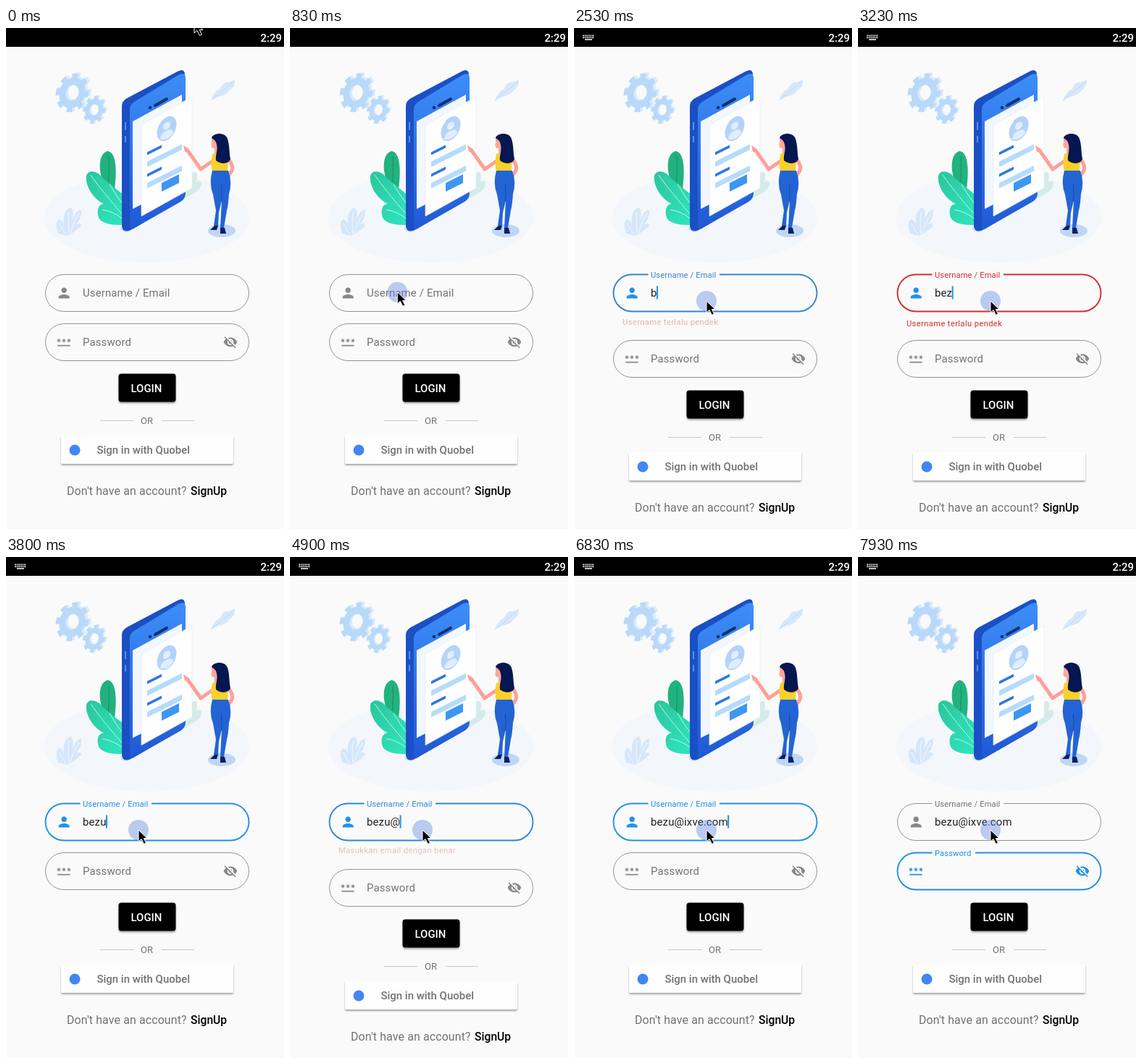
These frames come from a looping animation (384 by 692 pixels, 8000 ms). An HTML page:

```html
<!DOCTYPE html>
<html lang="en">
<head>
<meta charset="utf-8">
<title>Login form</title>
<style>
  html, body { margin: 0; width: 100%; height: 100%; overflow: hidden; background: #fafafa; }
  svg { display: block; width: 100vw; height: 100vh; }
  text { font-family: Roboto, sans-serif; font-size: 14.95px; letter-spacing: .14px; white-space: pre; }
  .medium { font-weight: 500; letter-spacing: 0; }
  .muted { fill: #727272; }
</style>
</head>
<body>
<svg viewBox="0 0 384 692">
  <defs>
    <linearGradient id="face" x1="0" y1="0" x2="0" y2="1">
      <stop offset="0" stop-color="#3d8ef8"/><stop offset="1" stop-color="#2059d6"/>
    </linearGradient>
    <linearGradient id="leaf" x1="0" y1="0" x2="1" y2="1">
      <stop offset="0" stop-color="#2cc59c"/><stop offset="1" stop-color="#2fe6c0"/>
    </linearGradient>
    <filter id="shadow" x="-10%" y="-20%" width="120%" height="160%">
      <feDropShadow dx="0" dy="2" stdDeviation="1.3" flood-color="#000" flood-opacity=".34"/>
    </filter>
    <g id="gear" fill="none">
      <circle r="15.5" stroke-width="10"/>
      <circle r="22.5" stroke-width="7" pathLength="16" stroke-dasharray="1 1"/>
    </g>
  </defs>

  <rect width="384" height="692" fill="#fafafa"/>

  <g id="illustration">
    <ellipse cx="194" cy="262" rx="142" ry="62" fill="#f3f7fc"/>
    <g transform="translate(95 88) skewY(-9) scale(.88 1.02)"><use href="#gear" stroke="#d9eafb"/><use href="#gear" x="-4" y="1" stroke="#b9d9fa"/></g>
    <g transform="translate(124 112) skewY(-9) scale(.6 .74)"><use href="#gear" stroke="#d9eafb"/><use href="#gear" x="-4" y="1" stroke="#b9d9fa"/></g>
    <path d="M283 100Q287 88 296 84 300 73 308 75L316 72Q317 80 309 86 303 94 293 95Z" fill="#d6e8fb"/>
    <path d="M283 100Q300 88 316 72" fill="none" stroke="#bfdbf8"/>
    <path d="M72 284Q67 270 73 264 79 265 80 273 78 252 89 248 95 251 91 267 97 251 104 251 105 262 97 271 103 268 104 273 96 282 84 287Z" fill="#d5e7fa"/>
    <path d="M74 270Q78 280 84 286M87 254Q85 273 87 284M101 256Q91 272 89 284" fill="none" stroke="#f5f9fe"/>
    <path d="M248 235C249 218 253 203 259 199 267 198 264 209 262 213 269 208 273 214 268 221 264 228 255 230 248 235Z" fill="#d3ece9"/>

    <path d="M134 213C127 194 128 174 140 170 153 171 153 199 150 222Z" fill="#22b27f"/>
    <path d="M142 177Q143 199 141 214" fill="none" stroke="#158d66"/>
    <path d="M164 272C143 273 128 269 127 258 125 247 131 243 135 243 119 235 109 216 111 204 114 195 127 197 134 208 145 215 151 223 164 231Z" fill="url(#leaf)"/>
    <path d="M117 203Q133 226 163 260M133 251Q148 253 163 265M143 216Q152 231 161 243" fill="none" stroke="#b9f7e8"/>
    <ellipse cx="166" cy="277" rx="8" ry="5" fill="#cfe0f5"/>

    <path d="M160 108Q160 101 167 97L237 60Q247 55 247 65L247 230Q247 236 241 240L172 279Q161 284 160 273Z" fill="#1b4fc4"/>
    <path d="M171 113Q171 106 177 102L238 65Q248 60 248 69L248 229Q248 235 242 239L178 276Q171 281 171 273Z" fill="url(#face)"/>
    <path d="M175 129L243 92V215L175 250Z" fill="#f2f7fe"/>
    <path d="M206 107L222 98" stroke="#15306f" stroke-width="4" stroke-linecap="round"/>
    <circle cx="199" cy="110" r="2.3" fill="#15306f"/>
    <path d="M165 130v11M165 149v9" stroke="#4f90f5" stroke-width="2"/>

    <path d="M187 134L257 95V221L187 260Z" fill="#fefefe" stroke="#e6edf6" stroke-width=".7"/>
    <g transform="translate(222 139) skewY(-25)">
      <ellipse rx="13.5" ry="16" fill="#b4d3fb"/>
      <circle cy="-4" r="5" fill="#e2eefd"/>
      <path d="M-9 10Q-8 2 0 3 8 2 9 10 0 18-9 10Z" fill="#e2eefd"/>
    </g>
    <g transform="translate(195 0) skewY(-26.5)">
      <path d="M0 171.5h20v4H0zM0 201.5h20v4H0z" fill="#2b78e6"/>
      <path d="M0 184.5h48v7.5H0zM0 214h48v7.5H0z" fill="#b5dbfd"/>
      <path d="M20 224h24v12H20z" fill="#3d96f2"/>
    </g>

    <ellipse cx="298" cy="280" rx="19" ry="9" fill="#bdd6f6"/>
    <path d="M306 180Q315 190 312 197L305 207" fill="none" stroke="#ff9f98" stroke-width="5" stroke-linejoin="round"/>
    <path d="M288 182L269 195 250 168" fill="none" stroke="#ff9f98" stroke-width="5" stroke-linejoin="round"/>
    <path d="M247 171L245 162 251 166 254 171Z" fill="#ff9f98"/>
    <path d="M284 150Q291 145 296 151V174H288V166Q282 167 284 158Z" fill="#ffa69d"/>
    <path d="M285 174Q297 169 307 178L306 199H285Q282 187 285 174Z" fill="#fbd02b"/>
    <path d="M285 197H307Q313 213 308 229 307 245 305 252L301 276H296L298 238 294 255 293 273H287L290 252 286 230Q280 215 285 197Z" fill="#2364d4"/>
    <path d="M297 216Q299 229 297 240" fill="none" stroke="#184aa8"/>
    <path d="M288 273L293 273 291 279H282ZM296 276H302L304 284H296Z" fill="#101f5e"/>
    <path d="M284 152C286 145 302 143 306 153 309 162 308 171 310 181 307 189 295 188 290 183 289 175 293 169 291 161Q290 155 284 152Z" fill="#061650"/>
  </g>

  <g id="fields"></g>
  <text id="error" x="67" fill="#d32f2f" style="font-size:11.2px;letter-spacing:.37px"></text>
  <text id="typed" x="106" y="370.5" fill="#212121"></text>
  <rect id="caret" y="356.5" width="2" height="18" fill="#2191e8"/>

  <g id="actions">
    <rect x="155.5" y="477.5" width="79" height="39" rx="3.7" fill="#000" filter="url(#shadow)"/>
    <text x="172.5" y="502.5" class="medium" fill="#fff">LOGIN</text>
    <path d="M130 542.5H176M215 542.5H260" stroke="#c8c8cc"/>
    <text x="186" y="546.8" class="muted" style="font-size:13px">OR</text>
    <rect x="76" y="563" width="238" height="39" rx="2" fill="#fefefe" filter="url(#shadow)"/>
    <circle cx="95" cy="583" r="7.5" fill="#4285f4"/>
    <text x="125.5" y="588" class="medium muted">Sign in with Quobel</text>
    <text x="84" y="645" class="muted" style="font-size:15.9px">Don't have an account?</text>
    <text x="255" y="645" class="medium" style="font-size:15.7px">SignUp</text>
  </g>

  <rect width="384" height="26" fill="#000"/>
  <text x="351.5" y="19" class="medium" fill="#fff">2:29</text>
  <g id="keyboard" fill="none" stroke="#bdbdbd" stroke-width="2">
    <path d="M12 10.5H28M12 13.3H28" stroke-dasharray="2 .6"/><path d="M15 16H25"/>
  </g>

  <g id="pointer">
    <circle id="halo" r="14" fill="#5b83e0" fill-opacity=".4"/>
    <path d="M0 0V16L4 12.5 7.5 19.5 10.5 18 7.3 11.5H12Z" fill="#000" stroke="#fff" stroke-width="1"/>
  </g>
</svg>

<script>
const LOOP = 8000;
const FADE = 167;
const SHIFT = 23;
const GRAY = [136, 136, 138], TEXT = [114, 114, 114], BLUE = [33, 145, 232], RED = [211, 47, 47];
const ADDRESS = 'bezu@ixve.com';
const KEY_TIMES = [2470, 2700, 2950, 3330, 4850, 5200, 5350, 5600, 5700, 6100, 6500, 6600, 6700];
const USER_FOCUS = 1720, PASSWORD_FOCUS = 7700;
const ERRORS = [
  { from: 2470, to: 3330, text: 'Username terlalu pendek' },
  { from: 4850, to: 6600, text: 'Masukkan email dengan benar' },
];
// Pointer stops: time, x, y
const PATH = [
  [30, 260, -9], [150, 214, 150], [270, 135, 230], [570, 135, 230],
  [900, 150, 382], [1300, 193, 357], [1800, 193, 357], [2130, 183, 377],
];
const ICONS = {
  person: '<path transform="translate(69 14.8) scale(.934)" d="M12 12c2.21 0 4-1.79 4-4s-1.79-4-4-4-4 1.79-4 4 1.79 4 4 4zm0 2c-2.67 0-8 1.34-8 4v2h16v-2c0-2.66-5.33-4-8-4z"/>',
  secret: `<g transform="translate(69.5 15) scale(.87)" fill="none" stroke="currentColor" stroke-width="1.3">
    <path d="M2 18H22" stroke-width="2"/>${[0, 8, 16].map(x =>
      `<path d="M${x + 1} 10h6m-4.5-2.6l3 5.2m0-5.2l-3 5.2"/>`).join('')}</g>
    <path transform="translate(299.8 15.6) scale(.85)" d="M12 7c2.76 0 5 2.24 5 5 0 .65-.13 1.26-.36 1.83l2.92 2.92c1.51-1.26 2.7-2.89 3.43-4.75-1.73-4.39-6-7.5-11-7.5-1.4 0-2.74.25-3.98.7l2.16 2.16C10.74 7.13 11.35 7 12 7zM2 4.27l2.74 2.74C3.08 8.3 1.78 10.02 1 12c1.73 4.39 6 7.5 11 7.5 1.55 0 3.03-.3 4.38-.84L19.73 22 21 20.73 3.27 3zM7.53 9.8l1.55 1.55c-.05.21-.08.43-.08.65 0 1.66 1.34 3 3 3 .22 0 .44-.03.65-.08l1.55 1.55c-.67.33-1.41.53-2.2.53-2.76 0-5-2.24-5-5 0-.79.2-1.53.53-2.2zm4.31-.78l3.15 3.15.02-.16c0-1.66-1.34-3-3-3z"/>`,
};

const $ = id => document.getElementById(id);
const clamp = v => Math.max(0, Math.min(1, v));
const smooth = v => v * v * (3 - 2 * v);
const lerp = (a, b, p) => a + (b - a) * p;
const progress = (t, start) => clamp((t - start) / FADE);
const ramp = (t, start) => smooth(progress(t, start));
const mix = (a, b, p) => a.map((v, i) => lerp(v, b[i], p));
const rgb = c => `rgb(${c.map(Math.round)})`;

function createField(label, icons, gapWidth) {
  const group = document.createElementNS('http://www.w3.org/2000/svg', 'g');
  group.innerHTML = `
    <rect x="54.5" y=".5" width="281" height="51" rx="25.5" fill="none"/>
    <rect x="102.5" y="-2" width="${gapWidth}" height="6" fill="#fafafa"/>
    <g>${icons}</g><text>${label}</text>`;
  $('fields').append(group);
  const [outline, gap, icon, text] = group.children;
  return (y, floated, focus, error) => {
    group.setAttribute('transform', `translate(0 ${y})`);
    outline.setAttribute('stroke', rgb(mix(mix(GRAY, BLUE, focus), RED, error)));
    outline.setAttribute('stroke-width', lerp(.9, 1.9, focus));
    const middle = 102.5 + gapWidth / 2;
    gap.setAttribute('transform', `translate(${middle * (1 - floated)}) scale(${floated} 1)`);
    const tint = rgb(mix(GRAY, BLUE, focus));
    icon.setAttribute('fill', tint);
    icon.setAttribute('color', tint);
    text.setAttribute('fill', rgb(mix(mix(TEXT, BLUE, focus), RED, error)));
    text.setAttribute('transform', `translate(106 ${lerp(30.5, 5, floated)}) scale(${lerp(1, .75, floated)})`);
  };
}

const drawUser = createField('Username / Email', ICONS.person, 98.5);
const drawPassword = createField('Password', ICONS.secret, 59.5);

function pointerAt(t) {
  const next = PATH.findIndex(stop => stop[0] > t);
  if (next === 0) return PATH[0].slice(1);
  if (next < 0) return PATH.at(-1).slice(1);
  const [t0, x0, y0] = PATH[next - 1], [t1, x1, y1] = PATH[next];
  const p = smooth((t - t0) / (t1 - t0));
  return [lerp(x0, x1, p), lerp(y0, y1, p)];
}

function render(t) {
  const message = ERRORS.find(e => t >= e.from && t < e.to + FADE);
  const error = message ? progress(t, message.from) - progress(t, message.to) : 0;
  const shift = message ? SHIFT : 0;
  const focus = ramp(t, USER_FOCUS), moved = ramp(t, PASSWORD_FOCUS);

  drawUser(340, focus, focus - moved, error ** 2);
  drawPassword(408 + shift, moved, moved, 0);
  $('actions').setAttribute('transform', `translate(0 ${shift})`);

  $('error').textContent = message ? message.text : '';
  $('error').setAttribute('opacity', error);
  $('error').setAttribute('y', 411.7 - 3.3 * (1 - error));

  const count = KEY_TIMES.filter(k => k <= t).length;
  const blinkOn = count > 0 && t < PASSWORD_FOCUS && (t - KEY_TIMES[count - 1]) % 1000 < 500;
  $('typed').textContent = ADDRESS.slice(0, count);
  $('caret').setAttribute('x', 105.5 + (count ? $('typed').getComputedTextLength() : 0));
  $('caret').setAttribute('opacity', blinkOn ? 1 : 0);
  $('keyboard').setAttribute('opacity', t >= 1900 ? 1 : 0);

  const pressed = t >= 1600 && t < 1760;
  $('pointer').setAttribute('transform', `translate(${pointerAt(t)})`);
  $('halo').setAttribute('opacity', t >= 60 ? 1 : 0);
  $('halo').setAttribute('stroke', pressed ? 'rgba(225,80,110,.55)' : 'none');
  $('halo').setAttribute('stroke-width', 3);
}

function tick() {
  render(performance.now() % LOOP);
  requestAnimationFrame(tick);
}
tick();
</script>
</body>
</html>
```
